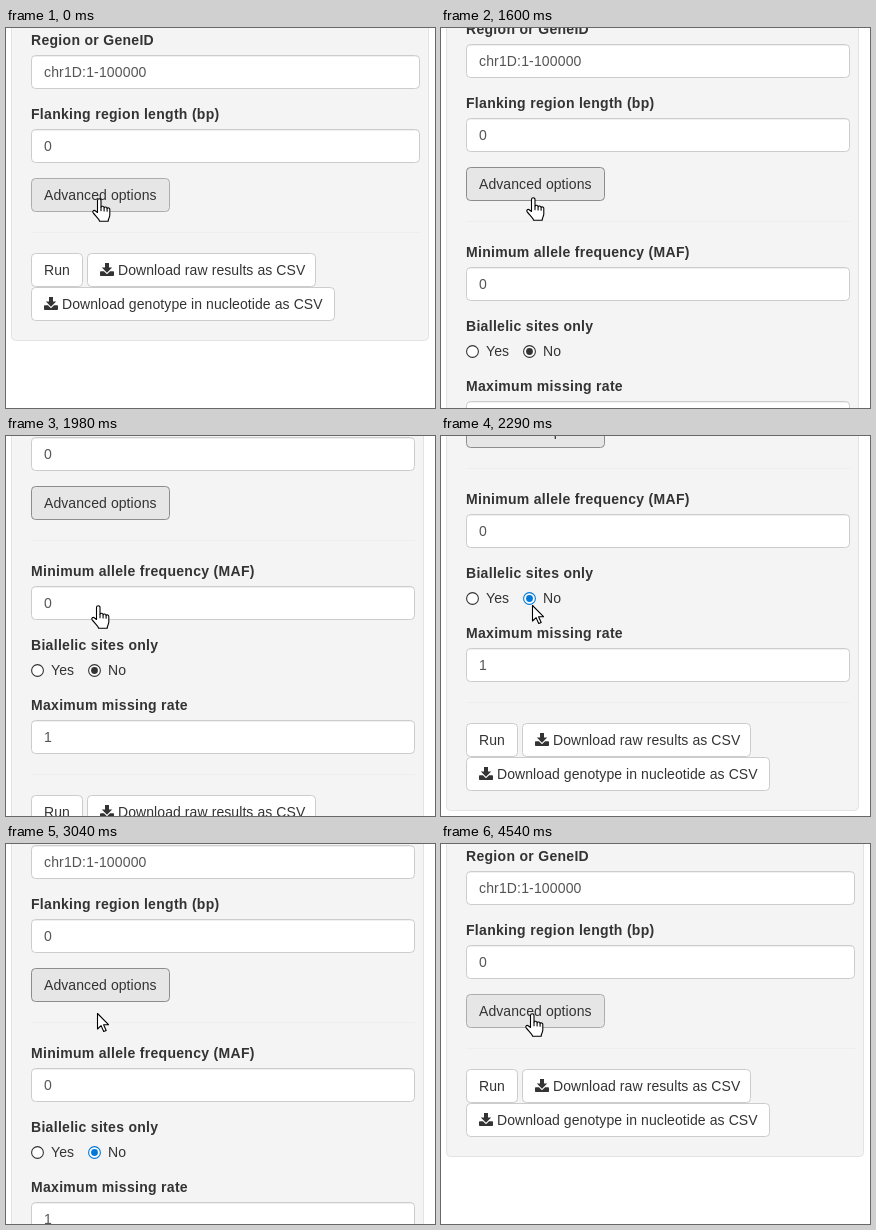
An HTML page for the animation above (4.66 s loop, 429x380 px).

```html
<!DOCTYPE html>
<html lang="en">
<head>
<meta charset="utf-8">
<title>Advanced options</title>
<style>
  html, body { margin: 0; width: 100%; height: 100%; overflow: hidden; background: #fff; }
  svg { display: block; width: 429px; height: 380px; }
  text { font: 14px "Liberation Sans", Arial, sans-serif; letter-spacing: .08px; fill: #333; white-space: pre; }
  .label { font-weight: bold; letter-spacing: .3px; }
  .value { fill: #555; letter-spacing: .15px; }
  .box { fill: #fff; stroke: #ccc; }
  .rule { stroke: #eee; }
  .inset { stroke: rgba(0, 0, 0, .06); }
  .ring { fill: #fff; stroke: #333; stroke-width: 1.1; }
  .cursor { fill: #fff; stroke: #000; stroke-width: 1.1; stroke-linejoin: round; stroke-linecap: round; }
</style>
</head>
<body>
<svg id="stage" viewBox="0 0 429 380"></svg>
<script>
const LOOP = 4660;
const EXTRA = 234; // height of the advanced section

// [time, scroll offset]
const SCROLL = [
  [0, 0], [1480, 3], [1550, 11], [1610, 24], [1670, 41], [1730, 58], [1790, 72],
  [1850, 88], [1980, 100], [2030, 114], [2100, 145], [2170, 168], [2230, 172],
  [2600, 168], [2660, 158], [2730, 140], [2790, 118], [2850, 95], [2910, 70],
  [2980, 46], [3040, 26], [3110, 14], [3170, 6], [3230, 1], [3300, 0]
];
// [time, x, y] of the hand pointer
const HAND = [
  [0, 86, 170], [540, 86, 169], [1480, 85, 169], [3300, 85, 169],
  [3500, 85, 165], [4480, 85, 167], [4540, 84, 169]
];

const label = (y, s) => `<text class="label" x="25" y="${y}">${s}</text>`;
const text = (x, y, s) => `<text x="${x}" y="${y}">${s}</text>`;
const rule = y => `<line class="rule fluid-line" x1="25" x2="414" y1="${y}.5" y2="${y}.5"/>`;
const input = (y, s) =>
  `<rect class="box fluid" x="25.5" y="${y}.5" width="388" height="33" rx="4"/>
   <line class="inset fluid-inset" x1="28" x2="411" y1="${y + 1}.5" y2="${y + 1}.5"/>
   <text class="value" x="38" y="${y + 22}">${s}</text>`;
const button = (x, y, w, s, id = "") =>
  `<rect ${id && `id="${id}"`} class="box" x="${x}.5" y="${y}.5" width="${w - 1}" height="33" rx="4"/>` + s;
const icon = (x, y) =>
  `<path fill="#333" transform="translate(${x} ${y})"
    d="M5 0h4v4.5h3.2L7 9.8 1.8 4.5H5zM0 9q0-.8.8-.8h3.1L7 11.3l3.1-3.1h3.1q.8 0 .8.8v3.2q0 .8-.8.8H.8q-.8 0-.8-.8z"/>`;
const radio = (x, id = "") =>
  `<circle ${id && `id="${id}"`} class="ring" cx="${x}" cy="334.5" r="5.9"/>`;

const stage = document.getElementById("stage");
stage.innerHTML = `
  <g id="page">
    <rect id="panel" x="5.5" y="-40.5" width="417" height="353" rx="4" fill="#f4f4f4" stroke="#e3e3e3"/>
    ${label(17, "Region or GeneID")}${input(27, "chr1D:1-100000")}
    ${label(91, "Flanking region length (bp)")}${input(101, "0")}
    ${button(25, 150, 139, text(38, 172, "Advanced options"), "toggle")}
    <g id="advanced">
      ${rule(204)}
      ${label(240, "Minimum allele frequency (MAF)")}${input(250, "0")}
      ${label(314, "Biallelic sites only")}
      ${radio(31.5)}${text(45, 339, "Yes")}
      ${radio(88.5, "ring")}<circle id="dot" cx="88.5" cy="334.5" r="3.4"/>${text(102, 339, "No")}
      ${label(374, "Maximum missing rate")}${input(384, "1")}
    </g>
    <g id="footer">
      ${rule(204)}
      ${button(25, 225, 52, text(38, 247, "Run"))}
      ${button(81, 225, 229, icon(94, 235) + text(112, 247, "Download raw results as CSV"))}
      ${button(25, 259, 304, icon(38, 269) + text(56, 281, "Download genotype in nucleotide as CSV"))}
    </g>
  </g>
  <circle id="click" cx="92" cy="166.5" r="12.5" fill="#fff200" fill-opacity=".62"/>
  <g id="hand" class="cursor">
    <path d="M5.5 14.5V2.5a1.75 1.75 0 0 1 3.5 0V9.3a1.6 1.6 0 0 1 3.1.5a1.6 1.6 0 0 1 3 .7a1.5 1.5 0 0 1 2.7 1V17c0 2.2-1.5 3.3-1.6 6.3H7.6C7.2 20.8 4 18.500 1 14.600c-.9-1.700 1-2.700 2.200-1.900z"/>
    <path fill="none" d="M9 9.500v3.200M12.100 10v3M15.100 10.800v2.500"/>
  </g>
  <path id="arrow" class="cursor" transform="translate(91.500 169.500)"
    d="M0 0V15.500l3.600-3.400 2.600 5.900 2.500-1.100-2.600-5.700h4.900z"/>`;

const $ = id => document.getElementById(id);
const all = c => stage.querySelectorAll("." + c);
const [page, panel, toggle, advanced, footer, ring, dot, click, hand, arrow] =
  ["page", "panel", "toggle", "advanced", "footer", "ring", "dot", "click", "hand", "arrow"].map($);
const fluid = all("fluid"), lines = all("fluid-line"), insets = all("fluid-inset");

const at = (table, t) => table.findLast(row => row[0] <= t);
const within = (t, a, b) => t >= a && t < b;
const show = (el, on) => el.setAttribute("visibility", on ? "visible" : "hidden");
const set = (els, name, v) => els.forEach(el => el.setAttribute(name, v));

function draw(t) {
  const open = within(t, 700, 3800);
  const shift = open ? EXTRA : 0;
  const narrow = open ? 5 : 0; // room taken by the scrollbar
  const hovering = within(t, 2290, 3300);
  const [, x, y] = at(HAND, t);

  page.setAttribute("transform", `translate(0 ${-at(SCROLL, t)[1]})`);
  panel.setAttribute("width", 417 - narrow);
  panel.setAttribute("height", 353 + shift);
  set(fluid, "width", 388 - narrow);
  set(lines, "x2", 414 - narrow);
  set(insets, "x2", 411 - narrow);
  show(advanced, open);
  footer.setAttribute("transform", `translate(0 ${shift})`);

  toggle.style.fill = "#e6e6e6";
  toggle.style.stroke = within(t, 1600, 3300) ? "#8c8c8c" : "#adadad";
  ring.style.stroke = hovering ? "#0078d7" : "#333";
  dot.style.fill = hovering ? "#0078d7" : "#333";

  show(click, within(t, 540, 860) || within(t, 3670, 3920));
  show(arrow, hovering);
  show(hand, !hovering);
  hand.setAttribute("transform", `translate(${x} ${y})`);
}

const start = performance.now();
function tick(now) {
  draw(Math.max(0, now - start) % LOOP);
  requestAnimationFrame(tick);
}
draw(0);
requestAnimationFrame(tick);
</script>
</body>
</html>
```
